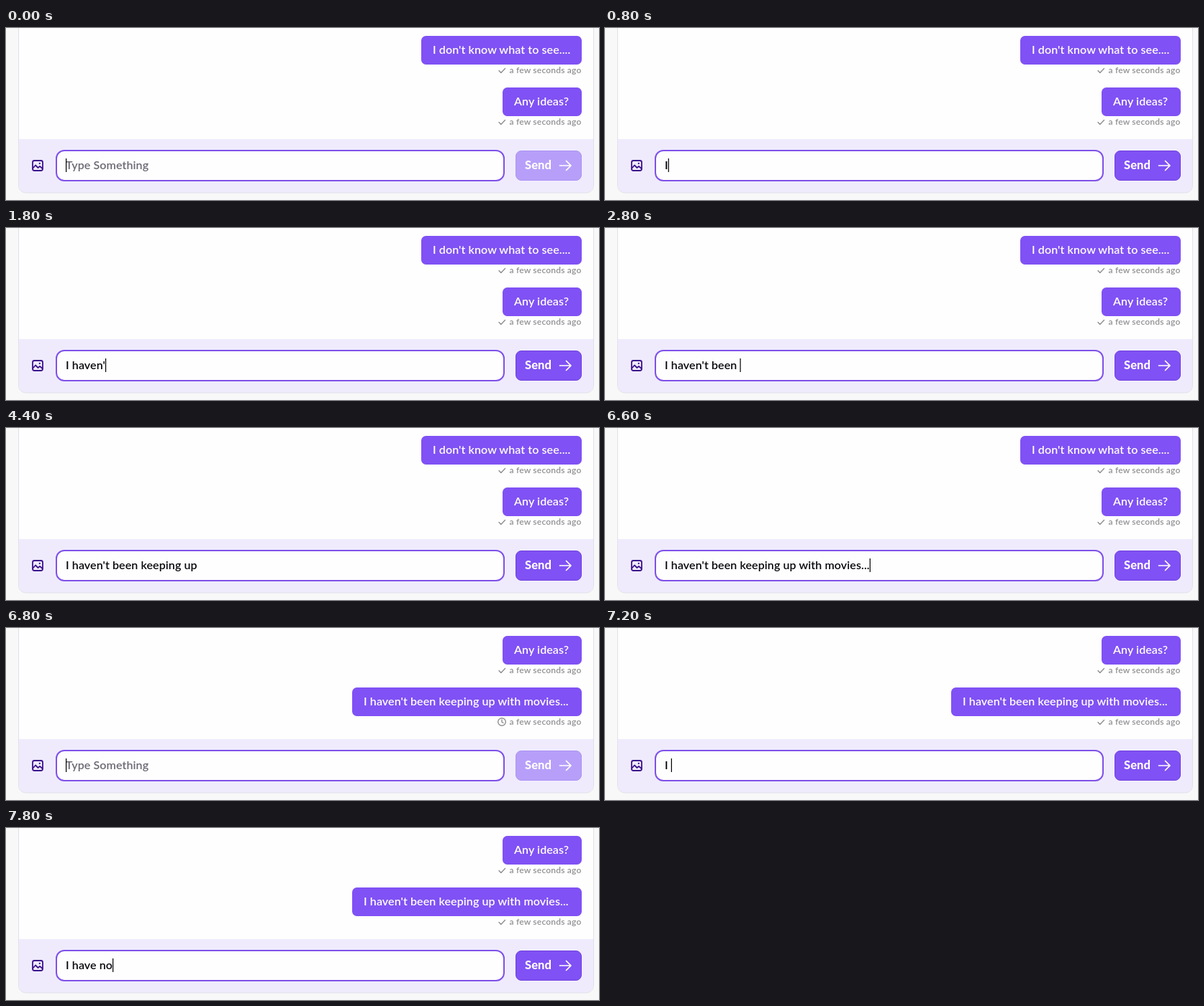
These frames come from a looping animation (824 by 240 pixels, 8000 ms). An HTML page:

```html
<!DOCTYPE html>
<html lang="en">
<head>
<meta charset="utf-8">
<title>Chat composer</title>
<style>
html, body { margin: 0; width: 824px; height: 240px; overflow: hidden; background: #f8f8f8; }
svg { display: block; }
text { font: 600 16px Lato, sans-serif; letter-spacing: .1px; white-space: pre; }
.bubble rect { fill: #8051f4; }
.bubble text { fill: #fff; }
.bubble .meta { font-size: 12px; letter-spacing: .2px; fill: #8f8f93; }
.line { fill: none; stroke-linecap: round; stroke-linejoin: round; }
.grey { stroke: #8f8f93; stroke-width: 1.4; }
.send text { font-weight: 800; font-size: 16.5px; fill: #fff; }
#hint { fill: #696873; }
#typed { fill: #08060c; }
</style>
</head>
<body>
<svg width="824" height="240" viewBox="0 0 824 240">
  <path d="M17.5-5V220a10 10 0 0 0 10 10H806.500a10 10 0 0 0 10-10V-5Z" fill="#fefefe"/>
  <g id="log"></g>
  <path d="M18 155H816V220a10 10 0 0 1-10 10H28a10 10 0 0 1-10-10Z" fill="#efebfd"/>
  <path d="M17.500-5V220a10 10 0 0 0 10 10H806.500a10 10 0 0 0 10-10V-5" fill="none" stroke="#e3e0ea"/>

  <g class="line" stroke="#3d138c" stroke-width="1.800">
    <rect x="37" y="185" width="14" height="14" rx="2.500"/>
    <path d="M37.500 195.500L41 191.500L44.500 195L47 193L50.500 196"/>
    <circle cx="46.800" cy="189" r=".5" stroke-width="1.300"/>
  </g>

  <rect x="70" y="171" width="622" height="42" rx="11" fill="#fefefe" stroke="#8051e8" stroke-width="2"/>
  <text id="hint" x="83" y="197">Type Something</text>
  <text id="typed" x="83" y="197"></text>
  <rect id="caret" y="182" width="1.200" height="19"/>

  <g class="send">
    <rect id="button" x="708.500" y="171.500" width="91" height="41" rx="7.500"/>
    <text x="721" y="197">Send</text>
    <path class="line" d="M769.500 192H785M778.500 185.500L785 192L778.500 198.500" stroke="#fff" stroke-width="1.700"/>
  </g>
</svg>
<script>
const LOOP = 8000, STEP = 200, SENT = 6800, DELIVERED = 7000;
const first = "I haven't been keeping up with movies...";
const second = "I have no";
const $ = id => document.getElementById(id);

const tick = y => `<path class="line grey" d="M685 ${y}l2.800 2.900l5.700-6"/>`;
const clock = y => `<g class="line grey"><circle cx="689" cy="${y}" r="5.300"/>
  <path d="M689 ${y - 3}v3.200l2 1.300"/></g>`;

function bubble(left, top, label, icons) {
  return `<g class="bubble">
    <rect x="${left}" y="${top}" width="${800 - left}" height="40" rx="6.500"/>
    <text x="${left + 16}" y="${top + 25}">${label}</text>
    ${icons}<text class="meta" x="699.500" y="${top + 52}">a few seconds ago</text>
  </g>`;
}

$("log").innerHTML =
  bubble(577, 11, "I don't know what to see....", tick(59.5)) +
  bubble(690, 83, "Any ideas?", tick(131.5)) +
  `<g id="reply">${bubble(481, 155, first,
    `<g id="pending">${clock(203)}</g><g id="done">${tick(203.5)}</g>`)}</g>`;

// [time, characters] between which typing runs evenly
const pace = [[800, 1], [2800, 15], [4000, 25], [4600, 25], [4800, 26], [6400, 40], [6800, 40]];

function typedAt(t) {
  if (t < 800) return "";
  if (t >= SENT) return second.slice(0, Math.max(0, Math.round((t - DELIVERED) / 100) + (t > 7600)));
  const i = pace.findIndex(p => p[0] > t);
  const [t0, n0] = pace[i - 1], [t1, n1] = pace[i];
  return first.slice(0, Math.floor(n0 + (n1 - n0) * (t - t0) / (t1 - t0) + 1e-6));
}

const show = (id, on) => $(id).setAttribute("visibility", on ? "visible" : "hidden");
let drawn = -1;

function draw(t) {
  const value = typedAt(t), sent = t >= SENT;
  $("typed").textContent = value;
  show("hint", !value);
  const width = value ? $("typed").getComputedTextLength() : 0;
  $("caret").setAttribute("x", 83 + width);
  show("caret", !((t >= 400 && t < 800) || (t >= 4400 && t < 4800)));
  $("button").setAttribute("fill", value ? "#8051f4" : "#b79ff9");
  $("button").setAttribute("stroke", value ? "#6f3fdf" : "#ad92f2");
  $("log").setAttribute("transform", `translate(0 ${sent ? -72 : 0})`);
  show("reply", sent);
  show("pending", sent && t < DELIVERED);
  show("done", sent && t >= DELIVERED);
}

function frame() {
  const t = Math.floor(performance.now() % LOOP / STEP) * STEP;
  if (t !== drawn) draw(drawn = t);
  requestAnimationFrame(frame);
}
frame();
</script>
</body>
</html>
```
